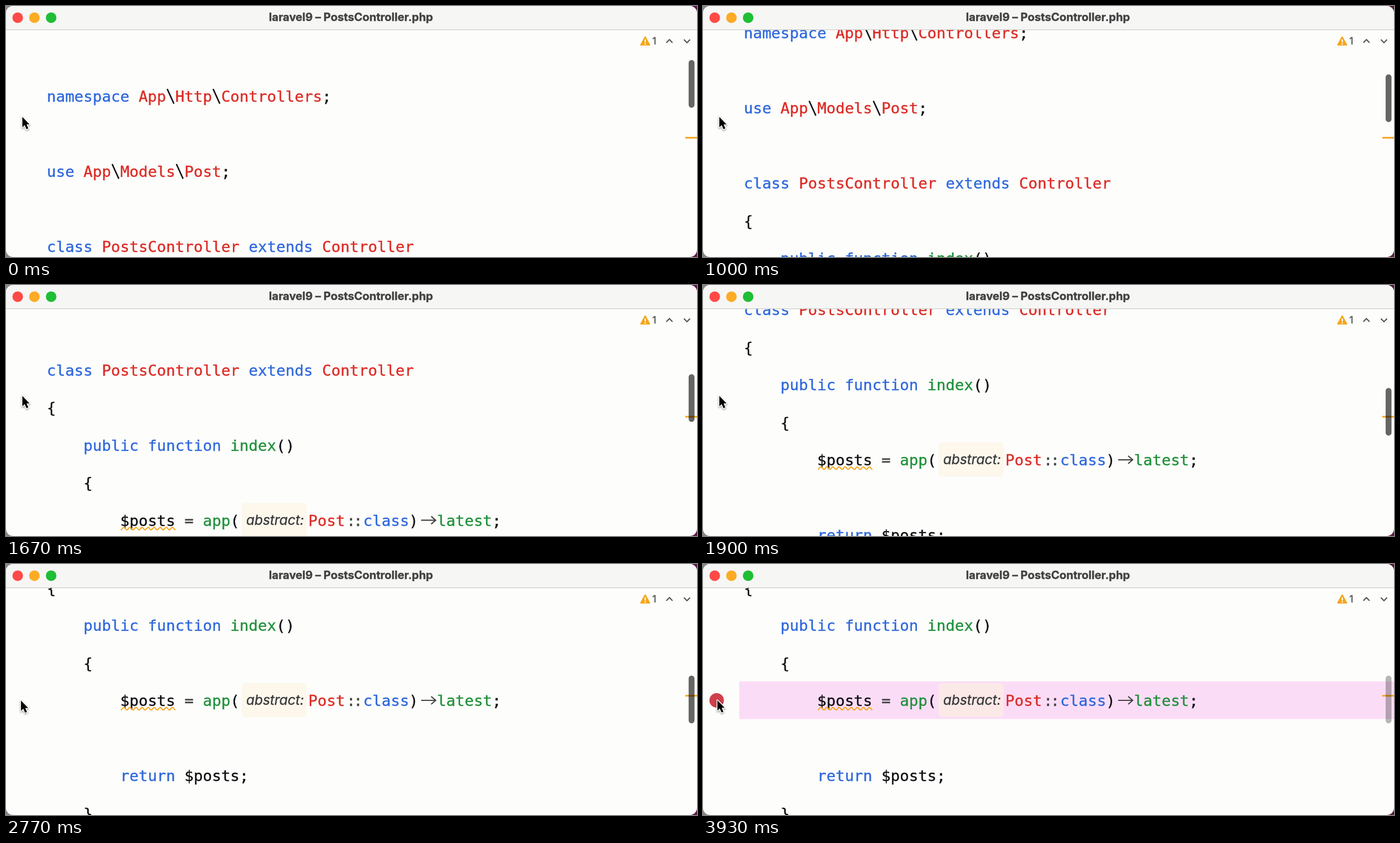
An HTML page with a canvas for the animation above (3960 ms loop, 1240 by 451 pixels).

```html
<!DOCTYPE html>
<html lang="en">
<head>
<meta charset="utf-8">
<title>Setting a breakpoint</title>
<style>
  html, body { margin: 0; width: 100%; height: 100%; overflow: hidden; }
  canvas { display: block; }
</style>
</head>
<body>
<canvas id="stage" width="1240" height="451"></canvas>
<script>
const ctx = document.getElementById('stage').getContext('2d');
const W = 1240, H = 451, LOOP = 3960;
const PITCH = 16.47, LEFT = 73.2, LINE = 67.5, FIRST_BASELINE = 172;
const CODE_FONT = '27.36px "DejaVu Sans Mono", monospace';
const BLUE = '#2f68dc', RED = '#dc2c26', GREEN = '#21903b', INK = '#111114', SOFT = '#444';
const ORANGE = '#f5a61c', PAPER = '#fdfdfb';
const CLICK = 2950;

// Each line: row, starting column, then [text, colour] pairs.
const LINES = [
  [0, 0, ['namespace ', BLUE], ['App', RED], ['\\', INK], ['Http', RED], ['\\', INK], ['Controllers', RED], [';', INK]],
  [2, 0, ['use ', BLUE], ['App', RED], ['\\', INK], ['Models', RED], ['\\', INK], ['Post', RED], [';', INK]],
  [4, 0, ['class ', BLUE], ['PostsController ', RED], ['extends ', BLUE], ['Controller', RED]],
  [5, 0, ['{', INK]],
  [6, 4, ['public function ', BLUE], ['index', GREEN], ['()', INK]],
  [7, 4, ['{', INK]],
  [8, 8, ['$posts ', INK], ['= ', SOFT], ['app', GREEN], ['(', INK]],
  [10, 8, ['return ', BLUE], ['$posts;', INK]],
  [11, 4, ['}', INK]]
];
const QUERY_ROW = 8;

// Keys: time, scroll offset, speed in px/ms.
const SCROLL = [[620, 0, 0], [1230, 195, 0.22], [1670, 279, 0.3], [2120, 457, 0]];
// Keys: time, x, y of the pointer tip.
const POINTER = [[2350, 28, 196.5], [2800, 25.5, 243], [3300, 25.5, 243], [3700, 24.5, 242]];

const clamp01 = v => Math.min(1, Math.max(0, v));
const smooth = v => v * v * (3 - 2 * v);
const baseline = row => FIRST_BASELINE + row * LINE;

function segment(keys, t) {
  let i = 0;
  while (i < keys.length - 2 && t >= keys[i + 1][0]) i++;
  const a = keys[i], b = keys[i + 1];
  return { a, b, span: b[0] - a[0], u: clamp01((t - a[0]) / (b[0] - a[0])) };
}

function scrollAt(t) {
  const { a, b, span, u } = segment(SCROLL, t);
  const s = smooth(u);
  return a[1] + (b[1] - a[1]) * s + span * (a[2] * u * (1 - u) ** 2 - b[2] * u * u * (1 - u));
}

function pointerAt(t) {
  const { a, b, u } = segment(POINTER, t), s = smooth(u);
  return [a[1] + (b[1] - a[1]) * s, a[2] + (b[2] - a[2]) * s];
}

function rect(x, y, w, h, fill, radius = 0) {
  ctx.fillStyle = fill;
  ctx.beginPath();
  ctx.roundRect(x, y, w, h, radius);
  ctx.fill();
}

function dot(x, y, r, fill) {
  ctx.fillStyle = fill;
  ctx.beginPath();
  ctx.arc(x, y, r, 0, 7);
  ctx.fill();
}

function polyline(points, stroke, width) {
  ctx.strokeStyle = stroke;
  ctx.lineWidth = width;
  ctx.beginPath();
  points.forEach(([x, y]) => ctx.lineTo(x, y));
  ctx.stroke();
}

// A hairline outline gives the text its slightly heavier weight.
function label(text, x, y, font, fill, align = 'left') {
  ctx.font = font;
  ctx.fillStyle = ctx.strokeStyle = fill;
  ctx.lineWidth = 0.4;
  ctx.textAlign = align;
  ctx.fillText(text, x, y);
  ctx.strokeText(text, x, y);
}

function tokens(list, x, y) {
  for (const [text, colour] of list) {
    if (text === '\\') polyline([[x + 2, y - 23], [x + 14, y + 3.5]], colour, 2.6);
    else label(text, x, y, CODE_FONT, colour);
    x += text.length * PITCH;
  }
}

function queryTail(y, marked) {
  rect(423, y - 41, 116.5, 61, marked ? '#fbe9e8' : '#fdf7ec', 6);
  label('abstract:', 431, y - 2, 'italic 24.4px Inter, sans-serif', '#39393b');
  tokens([['Post', RED]], 542.5, y);
  label(':', 611, y, CODE_FONT, SOFT);
  label(':', 623.5, y, CODE_FONT, SOFT);
  tokens([['class', BLUE], [')', INK]], 641, y);
  polyline([[745, y - 10], [771, y - 10]], SOFT, 2.2);
  polyline([[763, y - 17], [771, y - 10], [763, y - 3]], SOFT, 2.2);
  tokens([['latest', GREEN], [';', INK]], 773.5, y);

  const wave = [];
  for (let x = 206; x <= 304; x++) wave.push([x, y + 5 + 2.3 * Math.cos((x - 206) * Math.PI / 5.45)]);
  polyline(wave, ORANGE, 2);
}

function code(t, scroll) {
  const marked = t >= CLICK;
  ctx.save();
  ctx.beginPath();
  ctx.rect(0, 43, W, H - 43);
  ctx.clip();
  ctx.translate(0, -scroll);
  const y = baseline(QUERY_ROW);
  if (marked) {
    rect(65, y - 44, W - 65, LINE, '#fbdcf7');
    dot(24.5, y - 10, 13, '#ce404b');
  }
  for (const [row, column, ...list] of LINES) tokens(list, LEFT + column * PITCH, baseline(row));
  queryTail(y, marked);
  ctx.restore();
}

function titleBar() {
  rect(0, 0, W, 42, '#f6f6f5');
  rect(0, 42, W, 1.2, '#cbcbca');
  ['#ff4a46', '#fdab25', '#1fbe35'].forEach((fill, i) => dot(21 + 30 * i, 21, 9.5, fill));
  label('laravel9 – PostsController.php', 619, 27, '700 20.1px Inter, sans-serif', '#414141', 'center');
}

function inspections(t, scroll) {
  ctx.fillStyle = ctx.strokeStyle = ORANGE;
  ctx.lineWidth = 2;
  ctx.lineJoin = 'round';
  ctx.beginPath();
  ctx.moveTo(1147, 55.5);
  ctx.lineTo(1155, 70);
  ctx.lineTo(1139, 70);
  ctx.closePath();
  ctx.fill();
  ctx.stroke();
  rect(1146, 60, 2.2, 5.5, '#fff');
  rect(1146, 67, 2.2, 2.2, '#fff');
  label('1', 1160, 69, '17px Inter, sans-serif', '#555');
  polyline([[1185, 66], [1190.5, 60.3], [1196, 66]], '#555', 2.1);
  polyline([[1216.5, 60.3], [1222, 66], [1227.5, 60.3]], '#555', 2.1);

  rect(1219, 235.3, 21, 3, ORANGE);
  const alpha = 0.6 - 0.32 * clamp01((t - 3770) / 160);
  rect(1225, 97 + scroll * 0.2265, 10.5, 85.7, `rgba(0,0,0,${alpha})`, 5.2);
}

function pointer(x, y) {
  ctx.save();
  ctx.translate(x + 1.3, y + 2.8);
  const arrow = new Path2D('M0 0V18.6L4.2 14.8L7.4 22L10.8 20.6L7.7 13.4H13Z');
  ctx.lineJoin = 'round';
  ctx.strokeStyle = '#fff';
  ctx.lineWidth = 3;
  ctx.shadowColor = 'rgba(0,0,0,.4)';
  ctx.shadowBlur = 3;
  ctx.shadowOffsetY = 1.5;
  ctx.stroke(arrow);
  ctx.shadowColor = 'transparent';
  ctx.fillStyle = '#000';
  ctx.fill(arrow);
  ctx.restore();
}

function draw(now) {
  const t = now % LOOP, scroll = scrollAt(t);
  rect(0, 0, W, H, '#8b8889');
  rect(W / 2, 0, W / 2, H, '#5d1944');
  ctx.save();
  ctx.beginPath();
  ctx.roundRect(0, 0, W, H, 13);
  ctx.clip();
  rect(0, 0, W, H, PAPER);
  code(t, scroll);
  titleBar();
  inspections(t, scroll);
  pointer(...pointerAt(t));
  ctx.restore();
}

const start = performance.now();
function tick() {
  draw(performance.now() - start);
  requestAnimationFrame(tick);
}
tick();
</script>
</body>
</html>
```
